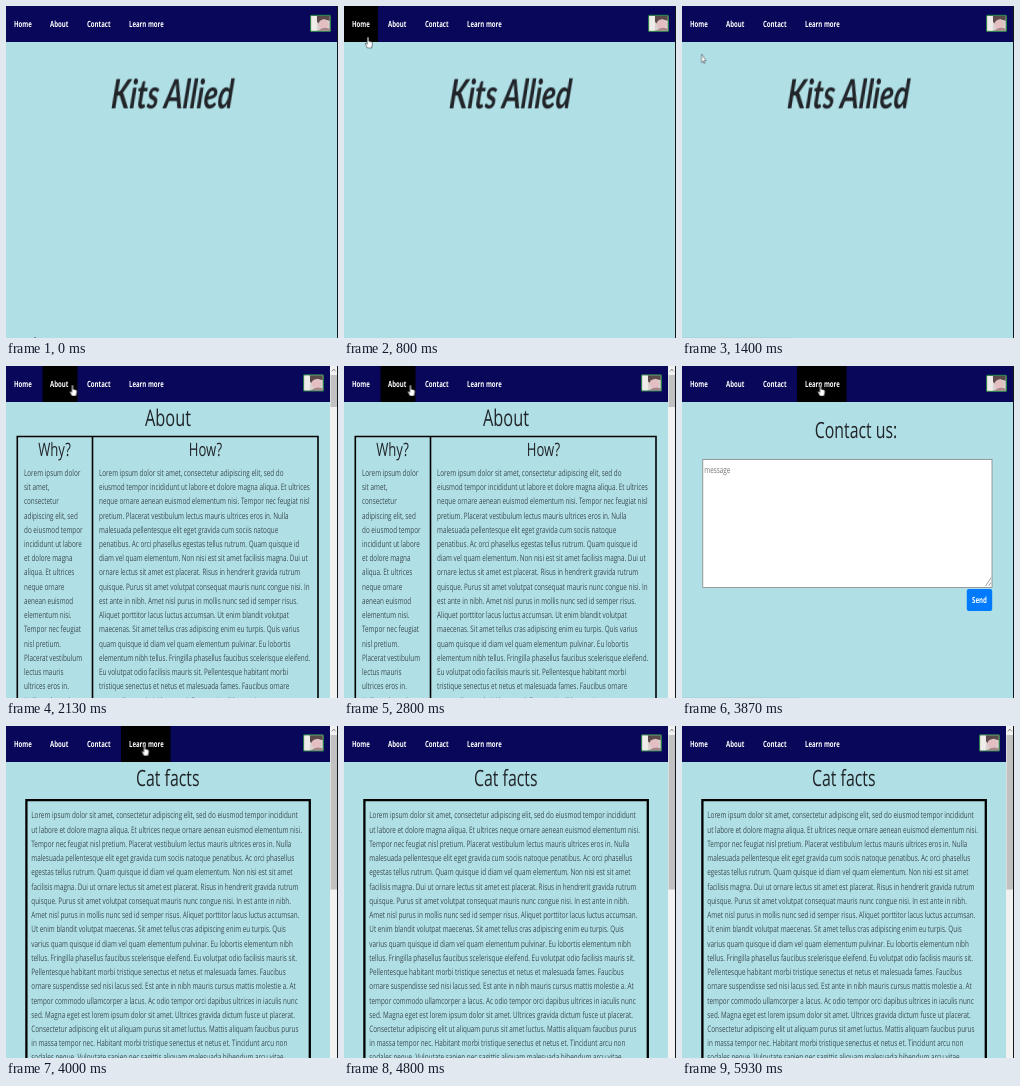
An HTML page that plays this animation: 332 by 332 pixels, repeating every 5990 ms.

```html
<!DOCTYPE html>
<html lang="en">
<head>
<meta charset="utf-8">
<title>Kits Allied</title>
<style>
  html, body { margin: 0; width: 100%; height: 100%; overflow: hidden; background: #b0e0e6; }
  svg { display: block; width: 100vw; height: 100vh; }
  text { font-family: "Open Sans", "Noto Sans", sans-serif; fill: #212529; white-space: pre; text-rendering: geometricPrecision; }
  .nav { font-weight: 700; fill: #fff; }
  .brand { font-family: Lato, "Open Sans", sans-serif; font-weight: 700; font-style: italic; }
  .body { fill: #3b4b50; }
  .hint { fill: #757575; }
</style>
</head>
<body>
<svg id="stage" viewBox="0 0 332 332" preserveAspectRatio="none"></svg>
<script>
const LOOP = 5990;
const SQUEEZE = 0.71;   // the whole page is narrowed by this factor
const LINE = 14.24;
const NAV = 36;
const INK = '#212529';
const stage = document.getElementById('stage');

function add(parent, tag, attrs = {}, content) {
  const el = document.createElementNS('http://www.w3.org/2000/svg', tag);
  for (const key in attrs) el.setAttribute(key, attrs[key]);
  if (content) el.textContent = content;
  parent.appendChild(el);
  return el;
}
const group = (parent = stage) => add(parent, 'g');
const rect = (parent, x, y, width, height, fill, more) =>
  add(parent, 'rect', { x, y, width, height, fill, ...more });
const path = (parent, d, more) => add(parent, 'path', { d, ...more });

function label(parent, x, y, size, str, { cls = '', anchor = 'start', slant = 0 } = {}) {
  return add(parent, 'text', {
    transform: `matrix(${SQUEEZE} 0 ${-slant} 1 ${x} ${y})`,
    'font-size': size, 'text-anchor': anchor, class: cls
  }, str);
}
const title = (parent, x, y, size, str) => label(parent, x, y, size, str, { anchor: 'middle' });
const lines = (parent, x, y, rows) =>
  rows.forEach((row, i) => label(parent, x, y + i * LINE, 8.93, row, { cls: 'body' }));

const timing = { duration: LOOP, iterations: Infinity };

// Visible only during the given [from, to] spans, with hard cuts.
function show(el, ...spans) {
  const at = t => spans.some(([a, b]) => t >= a && t < b) ? 1 : 0;
  const times = [...new Set([0, ...spans.flat(), LOOP])].sort((a, b) => a - b);
  el.animate(times.map(t => ({
    offset: t / LOOP, opacity: at(Math.min(t, LOOP - 1)), easing: 'step-end'
  })), timing);
}

function move(el, steps) {
  el.animate(steps.map(([t, x, y, easing = 'linear']) => ({
    offset: t / LOOP, transform: `translate(${x}px, ${y}px)`, easing
  })), timing);
}

function avatar(parent, x, y) {
  const g = add(parent, 'g', { transform: `translate(${x} ${y})` });
  rect(g, 0, 0, 21, 17.3, '#2f7d4c', { rx: 1.5 });
  rect(g, 1.3, 1.3, 18.4, 14.7, '#d9d3d2');
  rect(g, 1.3, 1.3, 5.5, 14.7, '#efedea');
  path(g, 'M7 1.3H19.7V6L14 4.5 9 9 7 7Z', { fill: '#5b4a4c' });
  add(g, 'ellipse', { cx: 13.5, cy: 9.5, rx: 5, ry: 4.6, fill: '#e3bfc2' });
  path(g, 'M8 16Q13 11.5 19.7 14V16Z', { fill: '#a8868b' });
}

function scrollbar(parent, thumbEnd) {
  rect(parent, 324, 0, 8, 332, '#f1f1f1');
  rect(parent, 324.6, 9, 6.4, thumbEnd - 9, '#c1c1c1');
  path(parent, 'M326 5.4 327.8 3 329.6 5.4', { fill: 'none', stroke: '#777', 'stroke-width': 0.8 });
}

// Page background
rect(stage, 0, 0, 332, 332, '#b0e0e6');
rect(stage, 0, 0, 332, NAV, '#08075a');

// Pages
const home = group(), about = group(), contact = group(), facts = group();

label(home, 165.5, 102.5, 40.5, 'Kits Allied', { cls: 'brand', anchor: 'middle', slant: 0.08 });

title(about, 162, 60, 23, 'About');
path(about, 'M11.3 332V70.5H312V332M86.5 70.5V332', { fill: 'none', stroke: '#000', 'stroke-width': 1.6 });
title(about, 48.5, 90.2, 18.4, 'Why?');
title(about, 199.5, 90.2, 18.4, 'How?');
lines(about, 18, 109.8, [
  'Lorem ipsum dolor', 'sit amet,', 'consectetur', 'adipiscing elit, sed',
  'do eiusmod tempor', 'incididunt ut labore', 'et dolore magna',
  'aliqua. Et ultrices', 'neque ornare', 'aenean euismod', 'elementum nisi.',
  'Tempor nec feugiat', 'nisl pretium.', 'Placerat vestibulum',
  'lectus mauris', 'ultrices eros in.', 'Nulla malesuada'
]);
lines(about, 93, 109.8, [
  'Lorem ipsum dolor sit amet, consectetur adipiscing elit, sed do',
  'eiusmod tempor incididunt ut labore et dolore magna aliqua. Et ultrices',
  'neque ornare aenean euismod elementum nisi. Tempor nec feugiat nisl',
  'pretium. Placerat vestibulum lectus mauris ultrices eros in. Nulla',
  'malesuada pellentesque elit eget gravida cum sociis natoque',
  'penatibus. Ac orci phasellus egestas tellus rutrum. Quam quisque id',
  'diam vel quam elementum. Non nisi est sit amet facilisis magna. Dui ut',
  'ornare lectus sit amet est placerat. Risus in hendrerit gravida rutrum',
  'quisque. Purus sit amet volutpat consequat mauris nunc congue nisi. In',
  'est ante in nibh. Amet nisl purus in mollis nunc sed id semper risus.',
  'Aliquet porttitor lacus luctus accumsan. Ut enim blandit volutpat',
  'maecenas. Sit amet tellus cras adipiscing enim eu turpis. Quis varius',
  'quam quisque id diam vel quam elementum pulvinar. Eu lobortis',
  'elementum nibh tellus. Fringilla phasellus faucibus scelerisque eleifend.',
  'Eu volutpat odio facilisis mauris sit. Pellentesque habitant morbi',
  'tristique senectus et netus et malesuada fames. Faucibus ornare',
  'suspendisse sed nisi lacus sed. Est ante in nibh mauris cursus'
]);

title(contact, 174, 71.6, 22.3, 'Contact us:');
rect(contact, 20.8, 93.5, 289.2, 128, '#fff', { stroke: '#858585', 'stroke-width': 0.8 });
label(contact, 22.3, 106.5, 8.93, 'message', { cls: 'hint' });
path(contact, 'M303.5 220 309 212M306.5 220 309 216.5', { stroke: '#777', 'stroke-width': 0.7 });
rect(contact, 284.8, 223, 25.4, 22, '#007bff', { rx: 2 });
label(contact, 297.5, 237.3, 8.6, 'Send', { cls: 'nav', anchor: 'middle' });

title(facts, 161.7, 60, 22.4, 'Cat facts');
path(facts, 'M20.4 332V74.1H303.8V332', { fill: 'none', stroke: '#000', 'stroke-width': 2.3 });
lines(facts, 25.3, 92.4, [
  'Lorem ipsum dolor sit amet, consectetur adipiscing elit, sed do eiusmod tempor incididunt',
  'ut labore et dolore magna aliqua. Et ultrices neque ornare aenean euismod elementum nisi.',
  'Tempor nec feugiat nisl pretium. Placerat vestibulum lectus mauris ultrices eros in. Nulla',
  'malesuada pellentesque elit eget gravida cum sociis natoque penatibus. Ac orci phasellus',
  'egestas tellus rutrum. Quam quisque id diam vel quam elementum. Non nisi est sit amet',
  'facilisis magna. Dui ut ornare lectus sit amet est placerat. Risus in hendrerit gravida rutrum',
  'quisque. Purus sit amet volutpat consequat mauris nunc congue nisi. In est ante in nibh.',
  'Amet nisl purus in mollis nunc sed id semper risus. Aliquet porttitor lacus luctus accumsan.',
  'Ut enim blandit volutpat maecenas. Sit amet tellus cras adipiscing enim eu turpis. Quis',
  'varius quam quisque id diam vel quam elementum pulvinar. Eu lobortis elementum nibh',
  'tellus. Fringilla phasellus faucibus scelerisque eleifend. Eu volutpat odio facilisis mauris sit.',
  'Pellentesque habitant morbi tristique senectus et netus et malesuada fames. Faucibus',
  'ornare suspendisse sed nisi lacus sed. Est ante in nibh mauris cursus mattis molestie a. At',
  'tempor commodo ullamcorper a lacus. Ac odio tempor orci dapibus ultrices in iaculis nunc',
  'sed. Magna eget est lorem ipsum dolor sit amet. Ultrices gravida dictum fusce ut placerat.',
  'Consectetur adipiscing elit ut aliquam purus sit amet luctus. Mattis aliquam faucibus purus',
  'in massa tempor nec. Habitant morbi tristique senectus et netus et. Tincidunt arcu non',
  'sodales neque. Vulputate sapien nec sagittis aliquam malesuada bibendum arcu vitae.'
]);

for (const page of [home, contact]) avatar(page, 304, 8.7);
for (const [page, thumbEnd] of [[about, 41], [facts, 163.5]]) {
  avatar(page, 297, 8.3);
  scrollbar(page, thumbEnd);
}

show(home, [0, 2000]);
show(about, [2000, 3000]);
show(contact, [3000, 4000]);
show(facts, [4000, LOOP]);

// Navigation: name, text x, hover box x and width, hover span
const hovers = [];
[
  ['Home', 8, 0, 34, 800, 1260],
  ['About', 44, 36.5, 35, 1860, 3000],
  ['Contact', 81, 73, 39.5, 3000, 3710],
  ['Learn more', 123, 115, 49.5, 3720, 4060]
].forEach(([name, x, boxX, width, from, to]) => {
  show(rect(stage, boxX, 0, width, NAV, '#000'), [from, to]);
  label(stage, x, 21.2, 8.5, name, { cls: 'nav' });
  hovers.push([from, to]);
});

// Link hint peeping in at the bottom edge
show(rect(stage, 0, 331, 109, 1, '#a8d6dc'), [930, 1670]);
show(rect(stage, 0, 331, 119, 1, '#a8d6dc'), [3800, 4000]);

// Window edge
rect(stage, 331, 0, 1, 332, '#10161a');

// Pointer
const pointer = group();
const arrow = path(pointer, 'M0 0V8.4L1.4 7 2.4 9.5 3.3 9 2.4 6.5H4.4Z',
  { fill: '#fff', stroke: INK, 'stroke-width': 0.5, 'stroke-linejoin': 'round' });
const hand = path(pointer,
  'M-.8 .6Q0-.6 .8 .6V4.2L3.8 5Q4.5 5.4 4.4 7L3.7 11H-.6L-2.6 7.2Q-2.8 6-1.8 6.3L-.8 7.4Z',
  { fill: '#fff', stroke: '#111', 'stroke-width': 0.5, 'stroke-linejoin': 'round' });
const [homeOver, aboutOver, contactOver, learnOver] = hovers;
show(arrow, [0, homeOver[0]], [homeOver[1], aboutOver[0]], [contactOver[1], learnOver[0]]);
show(hand, ...hovers);

move(pointer, [
  [0, 29, 331],
  [70, 29, 325, 'ease-out'],
  [600, 45, 64],
  [800, 24, 31],
  [930, 17, 19],
  [1130, 17, 19],
  [1400, 19.5, 48],
  [1640, 48, 71],
  [1730, 48, 68],
  [1930, 66.5, 19, 'step-end'],
  [3000, 98, 21],
  [3600, 98, 21, 'ease-in-out'],
  [3850, 138.5, 19],
  [4000, 138.5, 19],
  [4120, 138.5, -16],
  [LOOP, 138.5, -16]
]);
</script>
</body>
</html>
```
